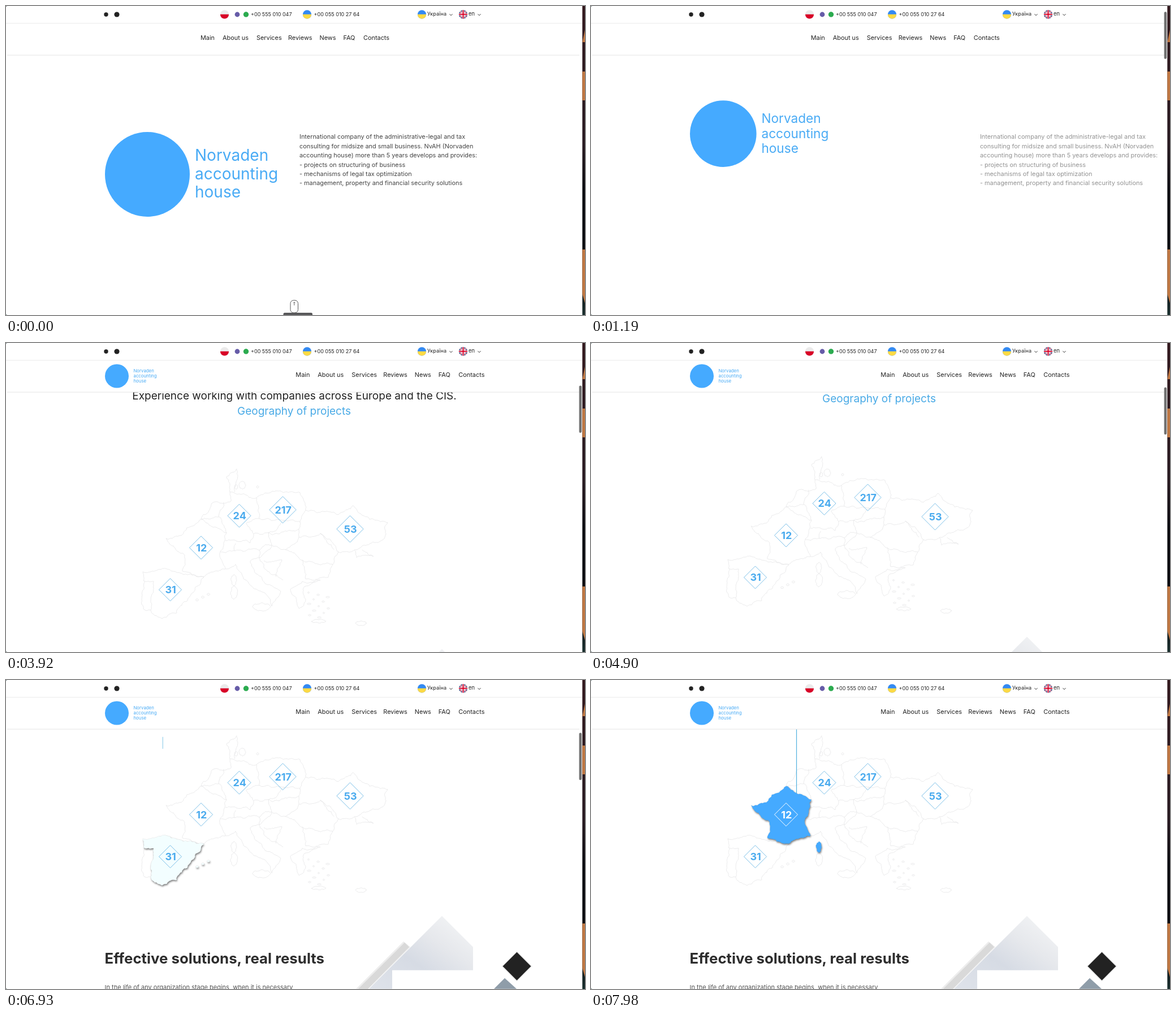
Recreate the animation shown at these times as an HTML page. Size 1024 by 547 pixels, loop 8000 ms.

```html
<!DOCTYPE html>
<html lang="en">
<head>
<meta charset="utf-8">
<title>Landing page scroll</title>
<style>
html, body { margin: 0; width: 100%; height: 100%; overflow: hidden; background: #fff; }
svg { display: block; width: 100vw; height: 100vh; font-family: Inter, "Open Sans", sans-serif; }
.hover { filter: drop-shadow(1px 2px 1.5px rgba(0, 0, 0, .5)); }
</style>
</head>
<body>
<svg id="stage" viewBox="0 0 1024 547" preserveAspectRatio="none"></svg>
<script>
const LOOP = 8000, STEP = 70;
const BLUE = '#45aaff';

// Key points of coasts and borders; rough() adds the detail
const parse = line => line.split(' ').map(p => p.split(',').map(Number));
const france = parse('345,188 390,212 379,245 388,276 350,290 312,280 316,252 283,222 310,217 316,209 345,188');
const spain = parse('242,281 272,277 350,291 325,325 302,354 276,364 256,349 261,298 243,297 242,281');
const borders = [
  '245,298 240,330 244,348 256,349',
  '396,140 390,113 408,99 404,140',
  '345,188 372,157 398,156 396,140 443,150 477,138 520,141 530,172',
  '385,158 376,184 390,212',
  '345,188 376,184',
  '443,150 448,187 425,196 438,214 432,230 388,226',
  '448,187 494,191 520,193 530,172',
  '438,214 464,212 494,191',
  '464,212 484,214 518,206 520,193',
  '464,212 470,234 494,242 518,220 518,206',
  '406,231 404,244 448,243 470,234',
  '379,245 404,244',
  '388,276 406,268 422,295 466,328 470,342 486,316 458,302 432,262 448,256 448,243',
  '470,234 448,256 462,280 490,296',
  '456,262 488,260 478,290',
  '494,242 530,264 578,268 588,246',
  '518,220 556,213 580,242',
  '556,213 588,246',
  '524,260 530,294 570,291 578,268',
  '503,312 524,298 556,296 526,310 530,330 518,346 503,312',
  '530,172 588,180 614,164 632,182 675,194 670,220 624,240 588,246',
  '616,242 620,256 650,254 630,242'
].map(parse);

function island(x, y, rx, ry) {
  return Array.from({ length: 9 }, (_, i) => {
    const a = i * Math.PI / 4;
    return [x + rx * Math.cos(a), y + ry * Math.sin(a)];
  });
}
const corsica = island(403, 296, 5, 10);
const balearics = [0, 1, 2].map(i => island(338 + i * 10, 331 - i * 5, 2.5, 1.8));
const islands = [island(418, 128, 6, 7), island(407, 131, 3, 4), island(445, 131, 2, 2),
  island(403, 318, 6, 12), island(452, 343, 16, 7), island(553, 369, 13, 3), island(628, 372, 10, 4)];
for (let i = 0; i < 12; i++) islands.push(island(535 + i * 17 % 42, 318 + i * 4, 1.5 + i % 3, 1.3));

// Midpoint displacement that depends on place only, so shared borders coincide
function split([ax, ay], [bx, by]) {
  const len = Math.hypot(bx - ax, by - ay);
  if (len < 4) return [[bx, by]];
  const mx = (ax + bx) / 2, my = (ay + by) / 2, k = Math.min(len * .14, 3);
  const mid = [mx + k * Math.sin(mx * 3.1 + my * 2.3), my + k * Math.sin(mx * 2.7 - my * 3.7)];
  return [...split([ax, ay], mid), ...split(mid, [bx, by])];
}
const rough = pts => 'M' + [pts[0], ...pts.slice(1).flatMap((p, i) => split(pts[i], p))]
  .map(p => p.map(v => v.toFixed(1)).join(' ')).join('L');
const outline = lines => lines.map(rough).join('');

const text = (x, y, size, fill, str, extra = '') =>
  `<text x="${x}" y="${y}" font-size="${size}" fill="${fill}" ${extra}>${str}</text>`;
const rect = (x, y, w, h, fill, extra = '') =>
  `<rect x="${x}" y="${y}" width="${w}" height="${h}" fill="${fill}" ${extra}/>`;
const dot = (x, y, r, fill) => `<circle cx="${x}" cy="${y}" r="${r}" fill="${fill}"/>`;
const diamond = (x, y, r) => `M${x} ${y - r}l${r} ${r}l${-r} ${r}l${-r} ${-r}z`;
const flag = (x, top, bottom) => dot(x, 14.8, 7.6, top) +
  `<path d="M${x - 7.6} 14.8a7.6 7.6 0 0 0 15.2 0z" fill="${bottom}"/>`;
const chevron = x => `<path d="M${x - 2.5} 14.2l2.5 2.6l2.5 -2.6" fill="none" stroke="#333"/>`;
const marker = (n, x, y, r) => `<g id="m${n}">
  <path d="${diamond(x, y, r)}" fill="none" stroke="#7cc0e8"/>
  ${text(x + .7, y + 6.5, 18, '#4aabee', n, 'font-weight="700" text-anchor="middle"')}</g>`;

const about = [
  'International company of the administrative-legal and tax',
  'consulting for midsize and small business. NvAH (Norvaden',
  'accounting house) more than 5 years develops and provides:',
  '- projects on structuring of business',
  '- mechanisms of legal tax optimization',
  '- management, property and financial security solutions'
];
const nav = [[344, 'Main'], [383, 'About us'], [443, 'Services'], [499, 'Reviews'],
  [554.5, 'News'], [596.5, 'FAQ'], [632, 'Contacts']];

const cross = (d, white, red) => `<path d="${d}" stroke="#fff" stroke-width="${white}"/>
  <path d="${d}" stroke="#d80027" stroke-width="${red}"/>`;
const unionFlag = `<g clip-path="url(#round)">${rect(800, 6, 17, 17, '#1b2a6b')}
  ${cross('M801 7.3l15 15M816 7.3l-15 15', 2.6, 1)}${cross('M808.5 6v17M800 14.8h17', 4, 2)}</g>`;

const stage = document.getElementById('stage');
stage.innerHTML = `
<defs>
  <clipPath id="round"><circle cx="808.5" cy="14.8" r="7.6"/></clipPath>
  <linearGradient id="sky" x1="0" y1="1" x2="1" y2="0">
    <stop offset="0" stop-color="#dfe3ea"/><stop offset=".4" stop-color="#d6dbe4"/>
    <stop offset=".65" stop-color="#e6e8ec"/><stop offset="1" stop-color="#f6f7f8"/>
  </linearGradient>
  <linearGradient id="desk" x1="0" y1="0" x2="0" y2="1">
    <stop offset="0" stop-color="#32181d"/><stop offset=".45" stop-color="#281a21"/>
    <stop offset=".6" stop-color="#0a0b10"/><stop offset=".9" stop-color="#0a0b10"/>
    <stop offset="1" stop-color="#1a302f"/>
  </linearGradient>
</defs>
${rect(0, 0, 1024, 547, '#fff')}
<g id="page">
  ${text(510, -23.5, 19, '#222', 'Experience working with companies across Europe and the CIS.', 'text-anchor="middle"')}
  ${text(509.5, 3.3, 19, '#49aae6', 'Geography of projects', 'text-anchor="middle"')}
  <path d="${outline([france, corsica, spain, ...balearics, ...islands, ...borders])}" fill="none" stroke="#e6e6e8" stroke-width=".8"/>
  <path id="spainLine" stroke="#50b0de" stroke-width="1.2"/>
  <path id="franceLine" stroke="#50b0de" stroke-width="1.2"/>
  <path id="spain" class="hover" d="${outline([spain, ...balearics])}"/>
  <path id="france" class="hover" d="${outline([france, corsica])}"/>
  ${marker(217, 489.5, 171.5, 23.6)}${marker(53, 608.5, 205.5, 23.6)}
  ${marker(24, 412.5, 182, 20.5)}${marker(12, 345, 238.5, 20.5)}${marker(31, 290.5, 313, 20)}
  ${text(174.5, 502, 25.8, '#2d2d2d', 'Effective solutions, real results', 'font-weight="700"')}
  ${text(174.5, 548, 11, '#555', 'In the life of any organization stage begins, when it is necessary')}
  <path d="M703 463L619 547H641L715 473z" fill="#ededed"/>
  <path d="M705 465L623 547H640L713 473z" fill="#d9d9d9"/>
  <path d="M771 418L826 473V514H683V547H642z" fill="url(#sky)"/>
  <path d="${diamond(903.5, 507, 27)}" fill="#ececec"/>
  <path d="${diamond(903.5, 507, 25)}" fill="#222"/>
  <path d="M882 528L863 547H903z" fill="#8f9da9"/>
</g>
<g id="about">${about.map((s, i) => text(519, 235.2 + i * 16.45, 10.9, '#444', s)).join('')}</g>
<g id="mouse">
  <rect x="503" y="521" width="13.5" height="22" rx="5.5" fill="#fff" stroke="#555"/>
  <path d="M509.8 524v6M508.3 525.5l1.5 -1.5l1.5 1.5" fill="none" stroke="#555" stroke-width=".9"/>
  ${rect(490.5, 543, 51.5, 8, '#58585a', 'rx="2.5"')}
</g>
${rect(0, 0, 1019, 87, '#fff')}
<path d="M0 30.7H1019" stroke="#ebebeb"/>
<path id="rule" stroke="#e4e4e4"/>
${dot(177, 15, 3.7, '#222')}${dot(196, 15, 4.6, '#222')}
${flag(386.5, '#ebebeb', '#d80027')}
${dot(409, 15, 4.4, '#665ca8')}${dot(424.5, 15, 4.7, '#2bab4f')}
${text(433, 18, 9, '#222', '+00 555 010 047')}
${flag(532.5, '#338af3', '#ffda44')}
${text(544.5, 18, 9, '#222', '+00 055 010 27 64')}
${flag(735.5, '#338af3', '#ffda44')}
${text(745, 17.3, 9.1, '#222', 'Україна')}${chevron(787)}
${unionFlag}${text(818, 17.3, 9.3, '#222', 'en')}${chevron(837)}
<g id="nav">${nav.map(([x, s]) => text(x, 59.6, 10.9, '#222', s)).join('')}</g>
<circle id="badge" fill="${BLUE}"/>
<g id="brand">${['Norvaden', 'accounting', 'house'].map(s => text(0, 0, 28, '#49abf5', s)).join('')}</g>
<rect id="bar" x="1013.6" width="4.5" height="83.5" rx="2.2" fill="#717171"/>
${rect(1019.3, 0, 5, 547, 'url(#desk)')}
<path d="M1024 42V64H1019.3zM1019.3 116H1024V167H1019.3zM1019.3 431H1024V526L1019.3 510z" fill="#c07843"/>
<path d="M0 0h2L0 2zM0 547h2L0 545z" fill="#8a9a9a"/>`;

const $ = id => document.getElementById(id);
const set = (el, attrs) => { for (const k in attrs) el.setAttribute(k, attrs[k]); };
const ramp = (t, from, to) => Math.min(1, Math.max(0, (t - from) / (to - from)));
const mix = (a, b, k) => `rgb(${a.map((v, i) => Math.round(v + (b[i] - v) * k))})`;

function hero(t) {
  const p = .3 * ramp(t, 280, 1190) + .7 * ramp(t, 1190, 1800);
  const q = Math.pow(p, 1.1);
  const r = 75 - 54 * p;
  set($('badge'), { cx: 175 + r, cy: 298 - 239.5 * p, r });
  [...$('brand').children].forEach((line, i) => set(line, {
    x: 334 - 108.5 * p,
    y: 274 - 222 * p + i * (32.5 - 23.5 * q),
    'font-size': 28 - 20.2 * q
  }));
  set($('nav'), { transform: `translate(${168.3 * q} 0)` });
  set($('about'), { transform: `translate(${563 * p} 0)`, opacity: Math.max(0, 1 - 1.4 * p) });
  set($('mouse'), { opacity: 1 - ramp(t, 0, 280) });
}

// The page stays pinned until the bar passes PIN
const PIN = 69.8, RATIO = 6.82;
function scroll(t) {
  const bar = 3 + 7.2 * ramp(t, 280, 1190) + 14.8 * ramp(t, 1190, 2590) + 44.8 * ramp(t, 2590, 3430) +
    8.8 * ramp(t, 3430, 4200) + 15 * ramp(t, 5110, 6180);
  const y = Math.max(0, bar - PIN) * RATIO;
  set($('page'), { transform: `translate(0 ${162 - y})`, opacity: ramp(t, 1260, 1610) });
  set($('bar'), { y: bar, opacity: ramp(t, 210, 350) - ramp(t, 7070, 7350) });
  set($('rule'), { d: `M2 87H${t < 7350 ? 1014 : 1019}` });
}

// A country lifts, turns blue and drops its guide line, s ms after the pointer arrives
function hover(name, mark, s, x, end) {
  const shown = ramp(s, 0, 70) - ramp(s, 770, 980);
  const k = ramp(s, 140, 280);
  set($(name), { opacity: shown, fill: mix([243, 254, 255], [69, 170, 255], k) });
  const [box, num] = $(mark).children;
  set(box, { stroke: mix([124, 192, 232], [255, 255, 255], k * shown) });
  set(num, { fill: mix([74, 171, 238], [255, 255, 255], k * shown) });
  const top = 101 - 15 * k;
  const tip = 101 + 21 * ramp(s, 70, 140) + (end - 122) * k;
  set($(name + 'Line'), { d: `M${x} ${top}V${tip}`, opacity: shown * (.6 + .4 * k) });
}

function draw(now) {
  const t = Math.floor(now % LOOP / STEP) * STEP;
  hero(t);
  scroll(t);
  hover('spain', 'm31', t - 6790, 277.3, 278);
  hover('france', 'm12', t - 7630, 363.5, 205);
}

const start = performance.now();
function tick() {
  draw(performance.now() - start);
  requestAnimationFrame(tick);
}
tick();
</script>
</body>
</html>
```
